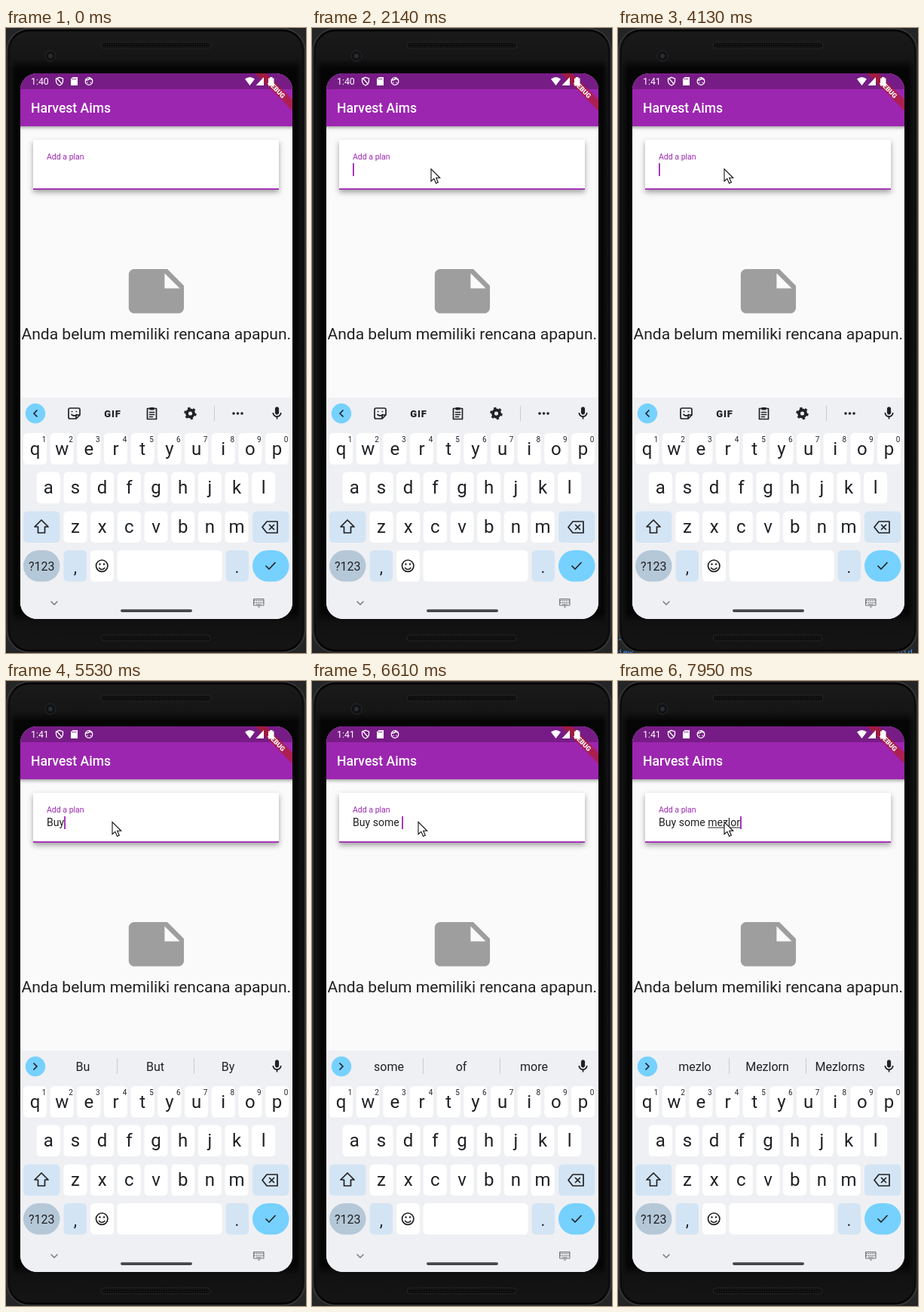
An HTML page for the animation above (8000 ms loop, 398 by 827 pixels).

```html
<!DOCTYPE html>
<html lang="id">
<head>
<meta charset="utf-8">
<title>Plan list</title>
<style>
html, body { margin: 0; width: 100%; height: 100%; overflow: hidden; background: #242527; }
svg { display: block; width: 100vw; height: 100vh; font-family: Roboto, sans-serif; }
text { white-space: pre; }
.mid { text-anchor: middle; }
.line { fill: none; stroke: #202124; stroke-width: 1.7; stroke-linecap: round; stroke-linejoin: round; }
</style>
</head>
<body>
<svg viewBox="0 0 398 827">
  <defs>
    <linearGradient id="glass">
      <stop offset="0" stop-color="#1b1b1b"/><stop offset=".03" stop-color="#050505"/>
      <stop offset=".97" stop-color="#050505"/><stop offset="1" stop-color="#1b1b1b"/>
    </linearGradient>
    <linearGradient id="caps" x2="0" y2="1">
      <stop offset="0" stop-color="#1a1a1a"/><stop offset=".045" stop-color="#151515"/>
      <stop offset=".06" stop-color="#151515" stop-opacity="0"/><stop offset=".94" stop-color="#111" stop-opacity="0"/>
      <stop offset=".955" stop-color="#111"/><stop offset="1" stop-color="#151515"/>
    </linearGradient>
    <pattern id="mesh" width="3" height="3" patternUnits="userSpaceOnUse">
      <rect width="3" height="3" fill="#0b0b0b"/><circle cx="1" cy="1" r=".7" fill="#2a2a2a"/>
    </pattern>
    <filter id="shadow" x="-10%" y="-30%" width="120%" height="170%">
      <feDropShadow dx="0" dy="3.5" stdDeviation="3.5" flood-opacity=".36"/>
    </filter>
    <filter id="barShadow" y="-10%" height="140%">
      <feDropShadow dx="0" dy="2" stdDeviation="2" flood-opacity=".35"/>
    </filter>
    <clipPath id="screen"><rect x="19" y="60" width="361" height="722" rx="22"/></clipPath>
  </defs>

  <g id="code" fill="#3f8cf0" font-size="11" font-family="Noto Sans Mono, monospace">
    <text x="0" y="810">r</text><text x="0" y="830">iew:</text><text x="371" y="830">oid.</text>
  </g>

  <rect x="1" y="1" width="396" height="825" rx="30" fill="url(#glass)" stroke="#3b3b3b" stroke-width="1.5"/>
  <rect x="4" y="4" width="390" height="819" rx="27" fill="url(#caps)" stroke="#050505"/>
  <g fill="url(#mesh)" stroke="#242424">
    <rect x="126" y="19" width="146" height="8" rx="4"/><rect x="126" y="803" width="145" height="8" rx="4"/>
  </g>
  <circle cx="59" cy="37" r="7" fill="#101113" stroke="#2b2b2b"/>
  <circle cx="59" cy="37" r="3" fill="#292c31"/>

  <g clip-path="url(#screen)">
    <rect x="19" y="60" width="361" height="722" fill="#fafafa"/>
    <rect x="12" y="60" width="375" height="70" fill="#9c27b0" filter="url(#barShadow)"/>
    <rect x="19" y="60" width="361" height="21" fill="#771c86"/>
    <g transform="translate(380 60) rotate(45)">
      <rect x="-35" y="24.6" width="70" height="10.5" fill="#b71c1c" fill-opacity=".63"/>
      <text class="mid" y="33.1" font-size="8.9" font-weight="900" fill="#fff">DEBUG</text>
    </g>
    <g fill="#fff">
      <text id="clock" x="33" y="75" font-size="12.3"></text>
      <path d="M323.5 76 317 67.5q6.5-5 13 0ZM331.500 76h10.500v-11ZM348 66.500h2v-1.500h3.500v1.500h2V76.500H348Z"/>
      <path d="M88.500 65h6.500v11h-9v-8.500Z"/>
      <text x="33" y="111.500" font-size="17.56" font-weight="500">Harvest Aims</text>
    </g>
    <path d="M88.700 66.500v2m2-2v2m2-2v2" stroke="#771c86"/>
    <g fill="none" stroke="#fff" stroke-width="1.3">
      <path d="m71 65.300 4.500 1.700v3q0 4-4.500 6-4.500-2-4.500-6v-3ZM67.500 66.500l7 8"/>
      <circle cx="110" cy="70.500" r="4.800"/><path d="M105.500 69q5 0 5.500-2.500 1 2 4 2M108 71.500v1.200m4-1.200v1.200"/>
    </g>

    <rect x="36" y="148" width="326" height="66" fill="#fff" filter="url(#shadow)"/>
    <rect x="36" y="212.200" width="326" height="1.800" fill="#9c27b0"/>
    <text x="54" y="173.500" font-size="10.53" fill="#9c27b0">Add a plan</text>
    <text id="entry" x="54" y="192.300" font-size="14.05" fill="#212121"></text>
    <rect id="underline" y="193.500" height="1" fill="#212121"/>
    <rect id="caret" y="179" width="1.800" height="17" fill="#9c27b0"/>

    <path transform="translate(155.500 304.300) scale(3.66)" fill="#9e9e9e"
      d="M22 10l-6-6H4c-1.100 0-2 .9-2 2v12c0 1.100.9 2 2 2h16c1.100 0 2-.9 2-2ZM15 5.500l5.500 5.500H15Z"/>
    <text class="mid" x="199.300" y="411.500" font-size="21.07" fill="#212121">Anda belum memiliki rencana apapun.</text>

    <rect x="19" y="489" width="361" height="293" fill="#eff0f3"/>
    <g id="keys" fill="#202124"></g>
    <circle cx="39" cy="510" r="13.200" fill="#76d1ff"/>
    <path id="arrow" class="line" d="m41 506-4 4 4 4"/>
    <path transform="translate(349.200 499.500) scale(.86)" fill="#202124"
      d="M12 14c1.660 0 3-1.340 3-3V5c0-1.660-1.340-3-3-3S9 3.340 9 5v6c0 1.660 1.340 3 3 3zm5-3c0 2.760-2.240 5-5 5s-5-2.240-5-5H5c0 3.530 2.610 6.430 6 6.920V21h2v-3.080c3.390-.49 6-3.390 6-6.920z"/>
    <g id="tools">
      <path class="line" d="M85 503h11q2 0 2 2v7l-5 5H85q-2 0-2-2v-10q0-2 2-2ZM98 512h-3q-2 0-2 2v3M87.500 507.500h.2m5.600 0h.2M87 511.500q3.500 3 6.500 0"/>
      <text class="mid" x="141.500" y="514.500" font-size="13" font-weight="900" letter-spacing=".8" fill="#202124">GIF</text>
      <path class="line" d="M187.500 503.500h12v14h-12ZM190.500 508.500h6m-6 3h6m-6 3h4"/>
      <path d="M190.500 502h6v3.500h-6Z" fill="#202124"/>
      <g fill="none" stroke="#202124">
        <circle cx="244.500" cy="510" r="4.500" stroke-width="3.800"/>
        <circle cx="244.500" cy="510" r="7" stroke-width="2.400" stroke-dasharray="3.300 4.030"/>
      </g>
      <path d="M276.500 500v20" stroke="#c9cbce"/>
      <g fill="#202124"><circle cx="302" cy="510" r="1.800"/><circle cx="307.500" cy="510" r="1.800"/><circle cx="313" cy="510" r="1.800"/></g>
    </g>
    <g id="hints" class="mid" font-size="16" fill="#202124">
      <path d="M147.500 499v21m102-21v21" stroke="#c9cbce"/>
      <text x="102" y="516"></text><text x="198" y="516"></text><text x="294.500" y="516"></text>
    </g>
    <path class="line" style="stroke:#707378;stroke-width:1.400" d="m60 759 4 4 4-4"/>
    <rect x="152" y="769.300" width="95" height="3.600" rx="1.800" fill="#45464a"/>
    <path d="M329 757.500h13m-13 3h13" stroke="#707378" stroke-width="1.700" stroke-dasharray="1.700 1.100"/>
    <path d="M328.500 755.500h13.500v8.500h-13.500ZM332 763h6.500M334 766h3" stroke="#707378" fill="none"/>
  </g>

  <path id="pointer" d="M0 0V16.200L3.900 12.800 6.500 19 9.300 17.800 6.700 11.800H11.700Z" fill="#fff" stroke="#111" stroke-width="1.100"/>
</svg>
<script>
const $ = id => document.getElementById(id);
const LOOP = 8000;

// Keyboard
const PITCH = 35.67, PALE = '#d3e5f5';
const key = (x, y, w, fill = '#fff', r = 5.5) =>
  `<rect x="${x}" y="${y}" width="${w}" height="41.500" rx="${r}" fill="${fill}"/>`;
const label = (x, y, size, text) =>
  `<text class="mid" x="${x}" y="${y}" font-size="${size}">${text}</text>`;
const row = (letters, center, y, digits) => [...letters].map((c, i) => {
  const x = center + i * PITCH;
  return key(x - 15.5, y, 31, '#fff') + label(x, y + 28.5, 24, c) +
    (digits ? label(x + 12, y + 11.500, 10, (i + 1) % 10) : '');
}).join('');

$('keys').innerHTML =
  row('qwertyuiop', 38.5, 536, true) + row('asdfghjkl', 56.3, 587.500) + row('zxcvbnm', 92, 639.500) +
  key(23, 639.5, 48.500, PALE) + key(327, 639.5, 48.500, PALE) +
  key(23, 691, 48.500, '#b5c8d8', 20.700) + key(327, 691, 48.500, '#76d1ff', 20.700) +
  key(76.500, 691, 30.500, PALE) + key(112, 691, 31) + key(147.500, 691, 139) + key(291.500, 691, 30.500, PALE) +
  label(47.300, 718, 16, '?123') + label(92, 721, 22, ',') + label(306.500, 721, 22, '.') +
  `<path class="line" d="m47 651-9 9h4.500v8h9v-8H56ZM346 653h14v15h-14l-6-7.500ZM349.500 657.500l6 6m0-6-6 6
    M345 712l4 4 8-8.500M123.500 714.500q3.700 4 7.400 0"/>
  <circle class="line" cx="127.200" cy="711.700" r="7.700"/>
  <circle cx="124.500" cy="709.500" r="1.200"/><circle cx="130" cy="709.500" r="1.200"/>`;

// Each edit: time, field text, whether the last word is underlined, suggestions
const edits = [
  [0, '', 0, ''],
  [4730, 'B', 0, 'B|But|By'],
  [5340, 'Bu', 0, 'B|But|By'],
  [5400, 'Bu', 1, 'Bu|But|By'],
  [5530, 'Buy', 0, 'Bu|But|By'],
  [5600, 'Buy', 1, 'Buy|Buying|Buys'],
  [5730, 'Buy ', 0, 'Buy|Buying|Buys'],
  [5800, 'Buy ', 0, 'it|the|a'],
  [6070, 'Buy s', 0, 'it|the|a'],
  [6140, 'Buy s', 1, 's|some|so'],
  [6190, 'Buy so', 0, 's|some|so'],
  [6230, 'Buy so', 1, 'so|some|something'],
  [6270, 'Buy som', 0, 'so|some|something'],
  [6340, 'Buy som', 1, 'som|some|something'],
  [6410, 'Buy some', 0, 'som|some|something'],
  [6480, 'Buy some', 1, 'some|something|someone'],
  [6610, 'Buy some ', 0, 'some|of|more'],
  [6810, 'Buy some m', 0, 'some|of|more'],
  [6940, 'Buy some m', 1, 'm|more|money'],
  [7340, 'Buy some me', 0, 'm|more|money'],
  [7410, 'Buy some me', 1, 'me|men|meat'],
  [7540, 'Buy some mez', 1, 'me|men|meat'],
  [7610, 'Buy some mezl', 0, 'mez|met|mel'],
  [7740, 'Buy some mezlo', 1, 'mezl|metal|meal'],
  [7880, 'Buy some mezlor', 0, 'mezlo|Mezlorn|Mezlorns'],
  [7950, 'Buy some mezlor', 1, 'mezlo|Mezlorn|Mezlorns'],
];
const caretToggles = [200, 620, 1150, 1680, 2140, 2670, 3200, 3660, 4130, 4660, 4730, 5270, 5340];
const hintTexts = $('hints').querySelectorAll('text');
const show = (id, on) => $(id).setAttribute('visibility', on ? 'visible' : 'hidden');

// Progress from 0 to 1 in held steps
const stepped = (t, start, end, steps) =>
  Math.max(0, Math.min(1, Math.floor((t - start) / (end - start) * steps + 1e-6) / steps));

function drawPointer(t) {
  const enter = 1 - (1 - stepped(t, 340, 750, 6)) ** 2;
  const shift = stepped(t, 3530, 3930, 5);
  const x = 320 - 162 * enter - 17 * shift, y = 695 - 508.500 * enter;
  $('pointer').setAttribute('transform', `translate(${x} ${y})`);
  show('pointer', t >= 340);
}

function drawEntry(t) {
  const [, text, underlined, hints] = edits.findLast(e => e[0] <= t);
  const entry = $('entry');
  entry.textContent = text;
  const width = text ? entry.getComputedTextLength() : 0;
  const wordStart = text.lastIndexOf(' ') + 1;
  const wordX = wordStart ? entry.getSubStringLength(0, wordStart) : 0;
  $('underline').setAttribute('x', 54 + wordX);
  $('underline').setAttribute('width', Math.max(0, width - wordX));
  $('caret').setAttribute('x', 54 + width);
  show('underline', underlined);
  show('caret', caretToggles.filter(time => time <= t).length % 2);
  show('tools', !hints);
  show('hints', hints);
  hints.split('|').forEach((hint, i) => hintTexts[i].textContent = hint);
  $('arrow').setAttribute('d', hints ? 'm37 506 4 4-4 4' : 'm41 506-4 4 4 4');
}

function frame(now) {
  const t = now % LOOP;
  drawEntry(t);
  drawPointer(t);
  $('clock').textContent = t < 3800 ? '1:40' : '1:41';
  show('code', t >= 3930 && t < 5270);
  requestAnimationFrame(frame);
}
requestAnimationFrame(frame);
</script>
</body>
</html>
```
